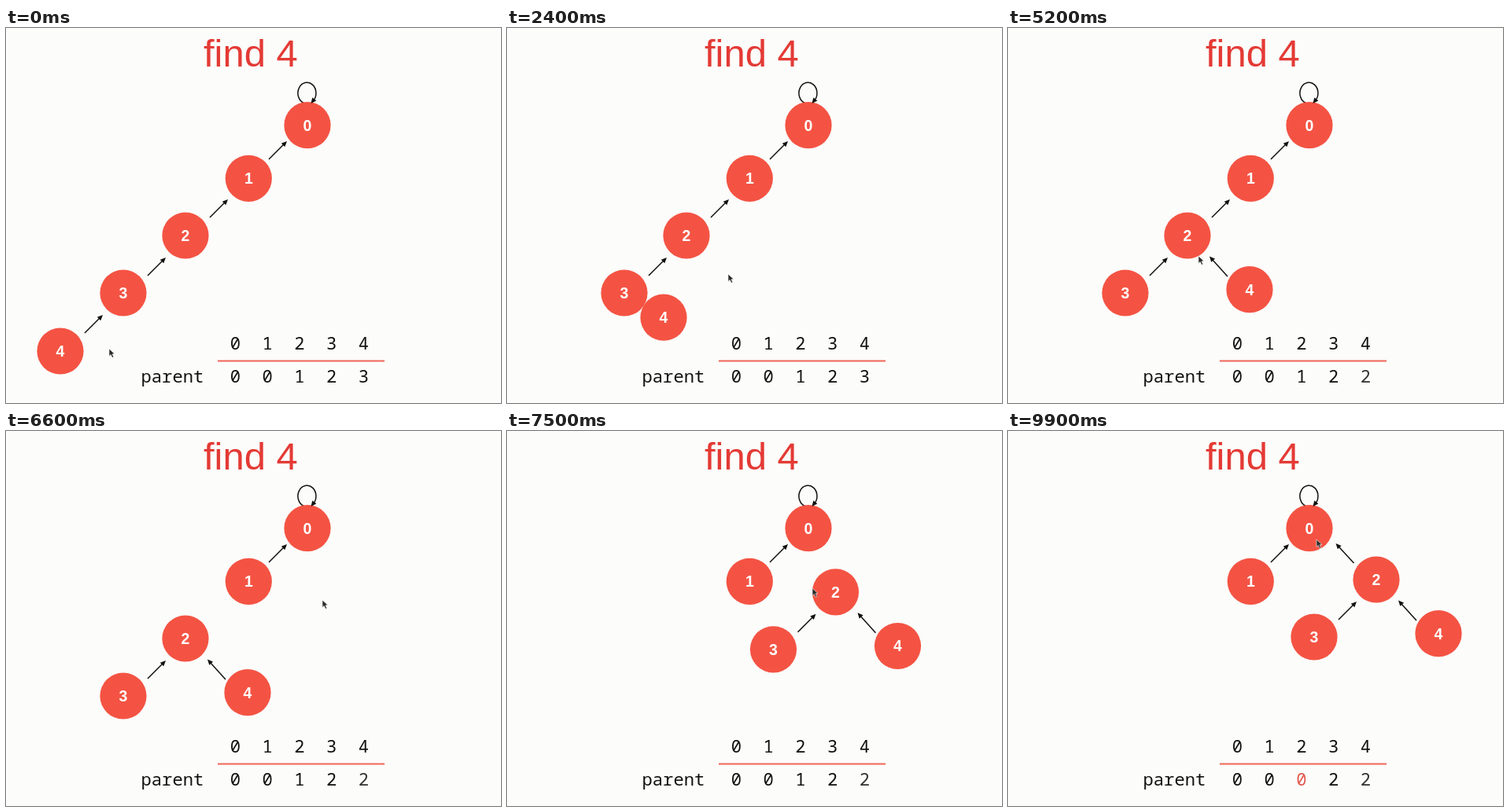
Write an HTML page that moves like this. It is 629x477 px and loops after 10 s.

```html
<!DOCTYPE html>
<html lang="en">
<head>
<meta charset="utf-8">
<title>Path halving</title>
<style>
  html, body { margin: 0; width: 100%; height: 100%; overflow: hidden; background: #fcfcfa; }
  svg { display: block; width: 629px; height: 477px; }
  .title { font: 49px "Liberation Sans", sans-serif; fill: #e43a35; }
  .node circle { fill: #f45343; }
  .node text { font: bold 19.5px "Liberation Sans", sans-serif; fill: #fff; text-anchor: middle; }
  .table { font: 22.2px "Noto Sans Mono", monospace; fill: #111; }
  .cell { text-anchor: middle; }
  .arrow { stroke: #111; stroke-width: 1.5; fill: none; }
  .head { fill: #111; stroke: none; }
</style>
</head>
<body>
<svg id="stage" viewBox="0 0 629 477"></svg>
<script>
const LOOP = 10000, STEP = 100, MOVE = 880;
const INK = '#111', RED = '#e2574d';
const stage = document.getElementById('stage');

function add(parent, tag, attrs, text) {
  const el = document.createElementNS('http://www.w3.org/2000/svg', tag);
  for (const k in attrs) el.setAttribute(k, attrs[k]);
  if (text !== undefined) el.textContent = text;
  parent.append(el);
  return el;
}

function head(parent, x, y, angle) {
  add(parent, 'path', {
    class: 'head', d: 'M0 0L-7 -3.2V3.2Z',
    transform: `translate(${x} ${y}) rotate(${angle})`
  });
}

function arrow(parent, x1, y1, x2, y2) {
  const g = add(parent, 'g', {});
  const a = Math.atan2(y2 - y1, x2 - x1);
  add(g, 'line', {
    class: 'arrow', x1, y1,
    x2: x2 - 5 * Math.cos(a), y2: y2 - 5 * Math.sin(a)
  });
  head(g, x2, y2, a * 180 / Math.PI);
  return g;
}

function node(parent, label, x, y) {
  const g = add(parent, 'g', { class: 'node', transform: `translate(${x} ${y})` });
  add(g, 'circle', { r: 29.6 });
  add(g, 'text', { y: 7 }, label);
  return g;
}

function cell(col, y, value) {
  return add(stage, 'text', { class: 'table cell', x: 291.3 + col * 40.75, y }, value);
}

add(stage, 'text', { class: 'title', x: 251, y: 49 }, 'find 4');

// Root and its fixed child
add(stage, 'path', { class: 'arrow', d: 'M378.5 95.5A11.5 13.5 0 1 1 390 93' });
node(stage, 0, 383, 123.7);
head(stage, 387.5, 96, 128);
node(stage, 1, 308.3, 191.3);
arrow(stage, 334, 167, 357, 144);

const link43 = arrow(stage, 100, 388, 123, 365);
const link21 = arrow(stage, 259, 241, 282, 218);
const link20 = arrow(stage, 439.5, 168, 416.5, 143);

// Subtree rooted at 2
const tree = add(stage, 'g', {});
const leaf = node(tree, 4, 69, 411);
node(tree, 3, 149, 337);
node(tree, 2, 228, 264);
arrow(tree, 180, 315, 203, 292);
const link42 = arrow(tree, 279, 316, 256, 290.5);

// Parent table
add(stage, 'line', { x1: 269, y1: 423.5, x2: 481, y2: 423.5, stroke: '#ef6659', 'stroke-width': 2 });
add(stage, 'text', { class: 'table', x: 171.5, y: 451 }, 'parent');
for (let i = 0; i < 5; i++) cell(i, 409, i);
const parents = [0, 0, 1, 2, 3].map((v, i) => cell(i, 451, v));
const newParent = cell(2, 451, 0);
newParent.style.fill = RED;

const cursor = add(stage, 'path', {
  d: 'M0 0V9.4L2.2 7.4 4 11.3 5.8 10.5 4.1 6.8 7 6.5Z',
  fill: '#2b2b2b', stroke: '#fff', 'stroke-width': 0.6
});

// Pointer stops: time, x, y
const stops = [
  [0, 131, 408], [300, 171, 346], [500, 171, 346], [1300, 188, 316],
  [1700, 200, 316], [2400, 281, 313], [2800, 322, 280], [3800, 340, 283],
  [5100, 340, 283], [5200, 242, 290], [5800, 242, 290], [5900, 320, 205],
  [6400, 320, 205], [6500, 402, 215], [6800, 402, 215], [7100, 357, 228],
  [7500, 388, 200], [7900, 399, 152], [8600, 390, 143], [9300, 390, 143],
  [9900, 392, 138]
];

const clamp = p => Math.max(0, Math.min(1, p));
const ramp = (t, from, to) => clamp((t - from) / (to - from));
const ease = p => (1 - Math.cos(Math.PI * p)) / 2;
const mix = (a, b, p) => a + (b - a) * p;
const place = (el, x, y) => el.setAttribute('transform', `translate(${x} ${y})`);
const fade = (el, p) => el.setAttribute('opacity', p);

function pointer(t) {
  const i = Math.max(1, stops.findIndex(s => s[0] >= t));
  const [t0, x0, y0] = stops[i - 1], [t1, x1, y1] = stops[i];
  const p = ramp(t, t0, t1);
  return [mix(x0, x1, p), mix(y0, y1, p)];
}

function draw(t) {
  fade(link43, 1 - ramp(t, 550, 1150));
  const a = ease(ramp(t, 1934, 1934 + MOVE));
  place(leaf, mix(69, 307, a), mix(411, 332.7, a));
  fade(link42, ramp(t, 2900, 3500));

  parents[4].textContent = t < 4000 ? 3 : 2;
  parents[4].style.fill = t < 4000 ? INK : t < 4100 ? RED : '#333';

  fade(link21, 1 - ramp(t, 6400, 6600));
  const b = ease(ramp(t, 6887, 6887 + MOVE));
  place(tree, 240 * b, -75 * b);
  fade(link20, ramp(t, 7900, 8500));

  const c = ramp(t, 9300, 9900);
  fade(parents[2], 1 - c);
  fade(newParent, c);

  place(cursor, ...pointer(t));
}

function tick() {
  const t = performance.now() % LOOP;
  draw(Math.floor(t / STEP) * STEP);
  requestAnimationFrame(tick);
}
tick();
</script>
</body>
</html>
```
